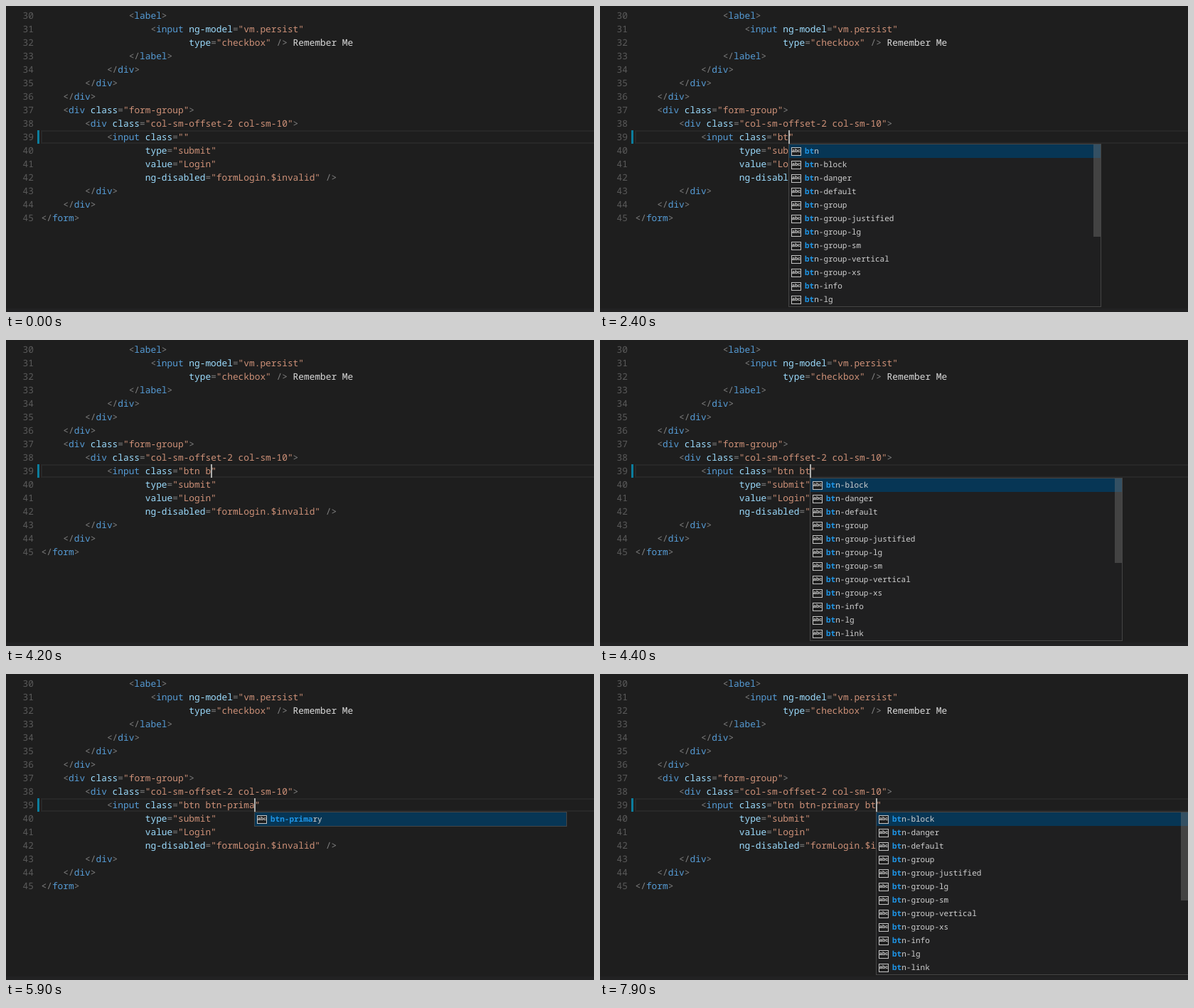
Write an HTML page that moves like this. It is 827 by 431 pixels and loops after 8000 ms.

```html
<!DOCTYPE html>
<html lang="en">
<head>
<meta charset="utf-8">
<title>Class completion in a code editor</title>
<style>
html, body { margin: 0; width: 100%; height: 100%; overflow: hidden; background: #1e1e1e; }
body {
  position: relative; color: #dcdcdc; white-space: pre;
  font: 12.833px/19px "Noto Sans Mono", "DejaVu Sans Mono", monospace;
  text-rendering: geometricPrecision; font-variant-ligatures: none;
}
body > * { position: absolute; }
#numbers { left: 23.5px; top: 4px; color: #5a5a5a; }
#code { left: 49.5px; top: 4px; }
#code div { height: 19px; }
#line { left: 49px; right: -4px; top: 175px; height: 15px; border: 2px solid #282828; }
#bar { left: 44px; top: 175px; width: 3px; height: 19px; background: #0c7d9d; }
#caret { top: 175px; width: 2px; height: 19px; background: #aeafad; }
#foot { left: 0; right: 0; top: 426px; height: 5px; background: #222223; }
.mark { color: #808080; }
.tag { color: #569cd6; }
.attr { color: #9cdcfe; }
.str { color: #ce9178; }
#popup {
  top: 194px; width: 438px; border: 1px solid #454545; background: #1f1f20;
  font-size: 11px; color: #d0d0d0;
}
.item { position: relative; height: 19px; padding-left: 22px; }
.item:first-child { background: #073655; }
.item b { color: #1e96e8; }
.icon {
  position: absolute; left: 3px; top: 4px; width: 12px; height: 10px;
  border: 1px solid #c5c5c5; background: #1e1e1e; color: #e0e0e0;
  font: bold 7px/9px "Liberation Sans", sans-serif; text-align: center;
}
#thumb { position: absolute; right: 0; top: 0; width: 10px; background: rgba(121, 121, 121, .4); }
</style>
</head>
<body><div id="line"></div><div id="numbers"></div><div id="code"></div><div id="bar"></div><div id="caret"></div><div id="popup"></div><div id="foot"></div>
<script>
const LOOP = 8000, LEFT = 49.5, CHAR = 7.7, VALUE_COL = 26, ROWS = 12, ROW = 19;
const $ = id => document.getElementById(id);

const source = [
  [16, '<label>'],
  [20, '<input ng-model="vm.persist"'],
  [27, 'type="checkbox" /> Remember Me'],
  [16, '</label>'],
  [12, '</div>'],
  [8, '</div>'],
  [4, '</div>'],
  [4, '<div class="form-group">'],
  [8, '<div class="col-sm-offset-2 col-sm-10">'],
  [12, '<input class=""'],
  [19, 'type="submit"'],
  [19, 'value="Login"'],
  [19, 'ng-disabled="formLogin.$invalid" />'],
  [8, '</div>'],
  [4, '</div>'],
  [0, '</form>']
];

const names = ['btn', ...('block danger default group group-justified group-lg group-sm ' +
  'group-vertical group-xs info lg link primary sm success toolbar warning xs')
  .split(' ').map(s => 'btn-' + s)];

// [start time, typed value, caret shown, number of suggestions]
const steps = [
  [0, '', 0, 0], [1100, '', 1, 0], [1500, '', 0, 0], [1900, '', 1, 0],
  [2300, 'b', 1, 0], [2400, 'bt', 1, 21], [2500, 'btn', 1, 21],
  [3000, 'btn', 0, 21], [3400, 'btn', 1, 21],
  [3600, 'btn ', 1, 0], [4000, 'btn ', 0, 0],
  [4200, 'btn b', 1, 0], [4300, 'btn bt', 1, 0], [4400, 'btn bt', 1, 23],
  [4600, 'btn btn', 1, 20], [4900, 'btn btn-', 1, 20],
  [5300, 'btn btn-p', 1, 1], [5400, 'btn btn-pr', 1, 1], [5600, 'btn btn-pri', 1, 1],
  [5800, 'btn btn-prim', 1, 1], [5900, 'btn btn-prima', 1, 1],
  [6400, 'btn btn-primar', 1, 1], [6600, 'btn btn-primary', 1, 1],
  [7000, 'btn btn-primary ', 1, 0], [7400, 'btn btn-primary ', 0, 0],
  [7700, 'btn btn-primary b', 1, 0], [7800, 'btn btn-primary bt', 1, 0],
  [7900, 'btn btn-primary bt', 1, 22]
];

function paint(indent, text) {
  const token = /("[^"]*")|(<\/?|\/?>|=)|([\w-]+)(?==)|(?<=<\/?)(\w+)/g;
  return ' '.repeat(indent) + text.replace(token, (all, str, mark, attr) => {
    const kind = str ? 'str' : mark ? 'mark' : attr ? 'attr' : 'tag';
    return `<span class="${kind}">${all.replace('<', '&lt;')}</span>`;
  });
}

function suggest(typed, count) {
  const used = typed.split(' '), prefix = used.pop();
  const items = names
    .filter(name => name.startsWith(prefix) && !used.includes(name))
    .slice(0, ROWS)
    .map(name => `<div class="item"><span class="icon">abc</span><b>${prefix}</b>${name.slice(prefix.length)}</div>`);
  const thumb = count > ROWS
    ? `<div id="thumb" style="height:${ROWS * ROWS * ROW / count}px"></div>` : '';
  return items.join('') + thumb;
}

$('numbers').textContent = source.map((_, i) => i + 30).join('\n');
$('code').innerHTML = source.map(line => `<div>${paint(...line)}</div>`).join('');
const edited = $('code').children[9];
let shown;

function draw() {
  const t = performance.now() % LOOP;
  // the saved value needs no change bar
  $('bar').hidden = t >= 6700 && t < 7200;
  const step = steps.findLast(s => s[0] <= t);
  if (step !== shown) {
    const [, typed, caret, count] = shown = step;
    const x = Math.floor(LEFT + (VALUE_COL + typed.length) * CHAR) + 'px';
    edited.innerHTML = paint(12, `<input class="${typed}"`);
    $('caret').style.left = $('popup').style.left = x;
    $('caret').hidden = !caret;
    $('popup').hidden = !count;
    $('popup').innerHTML = count ? suggest(typed, count) : '';
  }
  requestAnimationFrame(draw);
}
draw();
</script>
</body>
</html>
```
